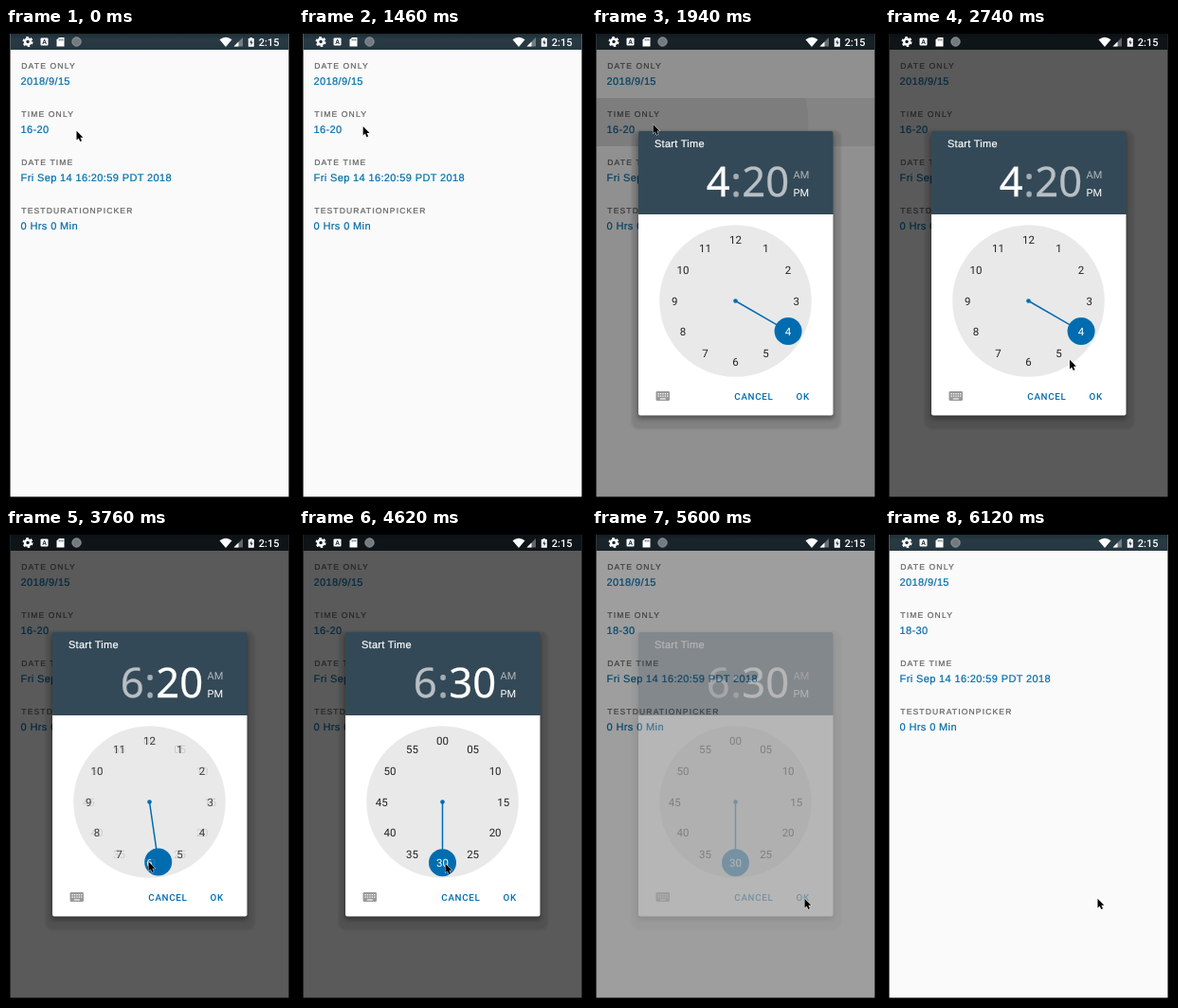
These frames come from a looping animation (303 px wide and 500 px high, 6.5 s). An HTML page:

```html
<!DOCTYPE html>
<html lang="en">
<head>
<meta charset="utf-8">
<title>Time picker</title>
<style>
  html, body { margin: 0; width: 100%; height: 100%; overflow: hidden; background: #000; }
  svg { display: block; width: 303px; height: 500px; }
  text { font: 11px Roboto, sans-serif; text-rendering: geometricPrecision; }
  .label, .value, .title { font-family: "Liberation Sans", Arial, sans-serif; stroke-width: .2px; }
  .label { font-size: 8.5px; letter-spacing: 1.17px; fill: #606060; stroke: #606060; }
  .value { letter-spacing: .37px; fill: #006ba8; stroke: #006ba8; }
  .title { letter-spacing: .27px; fill: #fff; stroke: #fff; }
  .big { font-family: "Noto Sans", sans-serif; font-size: 43.6px; fill: #fff; stroke: #fff; stroke-width: .3px; }
  .button { font-size: 9.8px; font-weight: 500; letter-spacing: .7px; fill: #006cb0; }
  .dial { font-size: 11.5px; text-anchor: middle; }
</style>
</head>
<body>
<svg viewBox="0 0 303 500">
  <defs>
    <clipPath id="row"><rect x="4.500" y="74" width="294" height="51"/></clipPath>
    <clipPath id="knobClip"><circle id="knobHole" r="14.500"/></clipPath>
    <filter id="soft" x="-10%" y="-10%" width="120%" height="120%"><feGaussianBlur stdDeviation="2.500"/></filter>
    <filter id="edge" x="-10%" y="-10%" width="120%" height="120%"><feGaussianBlur stdDeviation="1.200"/></filter>
    <linearGradient id="bar" x2="0" y2="1">
      <stop offset="0" stop-color="#1f2e36"/><stop offset=".35" stop-color="#283a44"/><stop offset="1" stop-color="#263740"/>
    </linearGradient>
  </defs>

  <rect width="303" height="500"/>
  <rect x="4.500" y="6" width="294" height="489.500" fill="#fafafa"/>
  <rect x="4.500" y="6" width="294" height="17" fill="url(#bar)"/>
  <g id="list"></g>
  <g id="ripple" clip-path="url(#row)">
    <rect x="4" y="74" width="295" height="51" fill-opacity=".08"/>
    <circle id="wave" cy="101" fill-opacity=".06"/>
  </g>
  <rect id="dim" x="4" y="6" width="295" height="490"/>

  <g id="status" fill="#fff">
    <circle cx="23" cy="14.500" r="3" fill="none" stroke="#fff" stroke-width="2.500"/>
    <circle cx="23" cy="14.500" r="4.700" fill="none" stroke="#fff" stroke-width="1.700" stroke-dasharray="2.600 2.320"/>
    <rect x="36.500" y="10.500" width="8" height="8" rx="1"/>
    <text x="40.500" y="17" text-anchor="middle" fill="#283a44" style="font-size:7px;font-weight:700">A</text>
    <path d="M56 10h5.500v9.500h-8v-7z"/>
    <path d="M56.200 11.500v2M58 11.500v2M59.800 11.500v2" stroke="#283a44" stroke-width=".8"/>
    <circle cx="74.500" cy="14.500" r="4.700" fill="#737b80"/>
    <circle cx="74.500" cy="14.500" r="4.700" fill="none" stroke="#a0a6aa" stroke-width=".8"/>
    <path d="M225.500 12.300Q232 7.300 238.500 12.300L232 20z"/>
    <path d="M250 10v9.500h-9.500z" fill-opacity=".35"/>
    <path d="M245.500 14.500v5h-5z"/>
    <path d="M257.500 10h2.600v1h1.700v8.700h-6v-8.700h1.700z"/>
    <path d="M259.300 12l-2 3.700h1.400v2.800l2-3.800h-1.400z" fill="#283a44"/>
    <text x="266.800" y="18.700" style="font-size:11px;font-weight:500">2:15</text>
  </g>

  <g id="dialog">
    <rect x="41.500" y="108" width="221.500" height="316" rx="8" fill-opacity=".1" filter="url(#edge)"/>
    <rect x="48" y="112" width="207" height="301" rx="3" fill-opacity=".35" filter="url(#soft)"/>
    <path d="M49 197h205.500v210.500q0 2-2 2h-201.500q-2 0-2-2z" fill="#fff"/>
    <path d="M49 197v-86q0-2 2-2h201.500q2 0 2 2v86z" fill="#344957"/>
    <text class="title" x="66" y="126">Start Time</text>
    <text id="hour" class="big" x="145.800" y="177.500" text-anchor="end">4</text>
    <text class="big" x="152" y="177.500" text-anchor="middle" opacity=".55">:</text>
    <text id="minute" class="big" x="158.300" y="177.500">20</text>
    <text x="212.500" y="159" fill="#fff" fill-opacity=".6">AM</text>
    <text x="212.500" y="177.500" fill="#fff">PM</text>

    <circle cx="151.500" cy="288.500" r="80.300" fill="#e9e9e9"/>
    <g id="dark" fill="#222"></g>
    <line id="hand" x1="151.500" y1="288.500" stroke="#006cb0" stroke-width="1.500"/>
    <circle cx="151.500" cy="288.500" r="2.300" fill="#006cb0"/>
    <circle id="knob" r="14.500" fill="#006cb0"/>
    <g id="light" fill="#fff" clip-path="url(#knobClip)"></g>

    <rect x="67.500" y="384" width="14.500" height="10" rx="1.200" fill="#999"/>
    <path d="M69.500 386.700h11M69.500 389.100h11" stroke="#fff" stroke-width="1.200" stroke-dasharray="1.300 1.100"/>
    <path d="M71.800 392h6" stroke="#fff" stroke-width="1.100"/>
    <rect id="press" x="203" y="376" width="40" height="27" rx="2"/>
    <text class="button" x="150.300" y="392.800">CANCEL</text>
    <text class="button" x="215.500" y="392.800">OK</text>
  </g>

  <path id="cursor" d="M.5.8v9.600l2.200-2 1.600 3.700 1.700-.8-1.600-3.600h3z" stroke="#fff" stroke-width=".9" stroke-linejoin="round" paint-order="stroke"/>
</svg>
<script>
const LOOP = 6500, CX = 151.5, CY = 288.5, REACH = 64.2;
const $ = id => document.getElementById(id);

function add(parent, tag, attrs, content = '') {
  const el = document.createElementNS('http://www.w3.org/2000/svg', tag);
  set(el, attrs);
  el.textContent = content;
  return parent.appendChild(el);
}
function set(el, attrs) {
  for (const k in attrs) el.setAttribute(k, attrs[k]);
}
const smooth = x => (1 - Math.cos(Math.PI * x)) / 2;
const linear = x => x;

// Value of a track [[time, value], ...] at time t
function at(t, track, ease = linear) {
  if (t <= track[0][0]) return track[0][1];
  for (let i = 1; i < track.length; i++) {
    const [t0, a] = track[i - 1], [t1, b] = track[i];
    if (t < t1) return a + (b - a) * ease((t - t0) / (t1 - t0));
  }
  return track[track.length - 1][1];
}
function polar(deg, r) {
  const a = deg * Math.PI / 180;
  return [CX + r * Math.sin(a), CY - r * Math.cos(a)];
}

const values = [
  ['DATE ONLY', '2018/9/15'],
  ['TIME ONLY', '16-20'],
  ['DATE TIME', 'Fri Sep 14 16:20:59 PDT 2018'],
  ['TESTDURATIONPICKER', '0 Hrs 0 Min'],
].map(([label, value], i) => {
  add($('list'), 'text', { class: 'label', x: 16.3, y: 43 + 51 * i }, label);
  return add($('list'), 'text', { class: 'value', x: 15.6, y: 60 + 51 * i }, value);
});

function numerals(parent, format) {
  const g = add(parent, 'g', {});
  for (let i = 0; i < 12; i++) {
    const [x, y] = polar(i * 30, REACH);
    add(g, 'text', { class: 'dial', x, y: y + 4 }, format(i));
  }
  return g;
}
const layers = [$('dark'), $('light')];
const hours = layers.map(g => numerals(g, i => i || 12));
const minutes = layers.map(g => numerals(g, i => String(i * 5).padStart(2, '0')));

const dimTrack = [[1765, 0], [1840, .18], [2000, .57], [2060, .64], [5470, .64], [5600, .37], [5780, .1], [5900, 0]];
const fadeTrack = [[1770, 0], [1840, .63], [1910, 1], [5470, 1], [5600, .25], [5660, 0]];
const waveTrack = [[1750, 35], [1840, 68], [2060, 190]];
const rippleTrack = [[1750, 0], [1790, 1], [2000, 1], [2400, 0]];
const pressTrack = [[5020, 0], [5090, .05], [5200, 0]];
const cursorTrack = [
  [1200, 74, 108], [1620, 64, 101], [2410, 64, 101], [2740, 194.5, 350],
  [2900, 181, 358], [3080, 156, 354], [3300, 150, 351], [3800, 150, 351],
  [4180, 154, 353], [4620, 154, 353], [4880, 224, 390],
];
const cursorX = cursorTrack.map(([t, x]) => [t, x]);
const cursorY = cursorTrack.map(([t, , y]) => [t, y]);
const PICK_HOUR = 3320, SWITCH = 3640, PICK_MINUTE = 4200, CONFIRM = 5460;

function render(t) {
  const swap = at(t, [[SWITCH, 0], [SWITCH + 500, 1]], smooth);
  const angle = t < PICK_HOUR ? 120 : t < PICK_MINUTE ? 180 - 60 * swap : 180;
  const [x, y] = polar(angle, REACH), [x2, y2] = polar(angle, REACH - 14);

  values[1].textContent = t < CONFIRM ? '16-20' : '18-30';
  set($('dim'), { opacity: at(t, dimTrack) });
  set($('dialog'), { opacity: at(t, fadeTrack) });
  set($('ripple'), { opacity: at(t, rippleTrack) });
  set($('wave'), { cx: at(t, [[1840, 65], [2060, 151]]), r: at(t, waveTrack) });
  set($('press'), { opacity: at(t, pressTrack) });

  $('hour').textContent = t < PICK_HOUR ? 4 : 6;
  $('minute').textContent = t < PICK_MINUTE ? 20 : 30;
  set($('hour'), { opacity: t < SWITCH ? 1 : .65 });
  set($('minute'), { opacity: t < SWITCH ? .65 : 1 });

  hours.forEach(g => set(g, { opacity: 1 - swap }));
  minutes.forEach(g => set(g, { opacity: swap }));
  set($('hand'), { x2, y2 });
  set($('knob'), { cx: x, cy: y });
  set($('knobHole'), { cx: x, cy: y });
  set($('cursor'), { transform: `translate(${at(t, cursorX, smooth)} ${at(t, cursorY, smooth)})` });
}

const start = performance.now();
function tick() {
  render((performance.now() - start) % LOOP);
  requestAnimationFrame(tick);
}
render(0);
requestAnimationFrame(tick);
</script>
</body>
</html>
```
